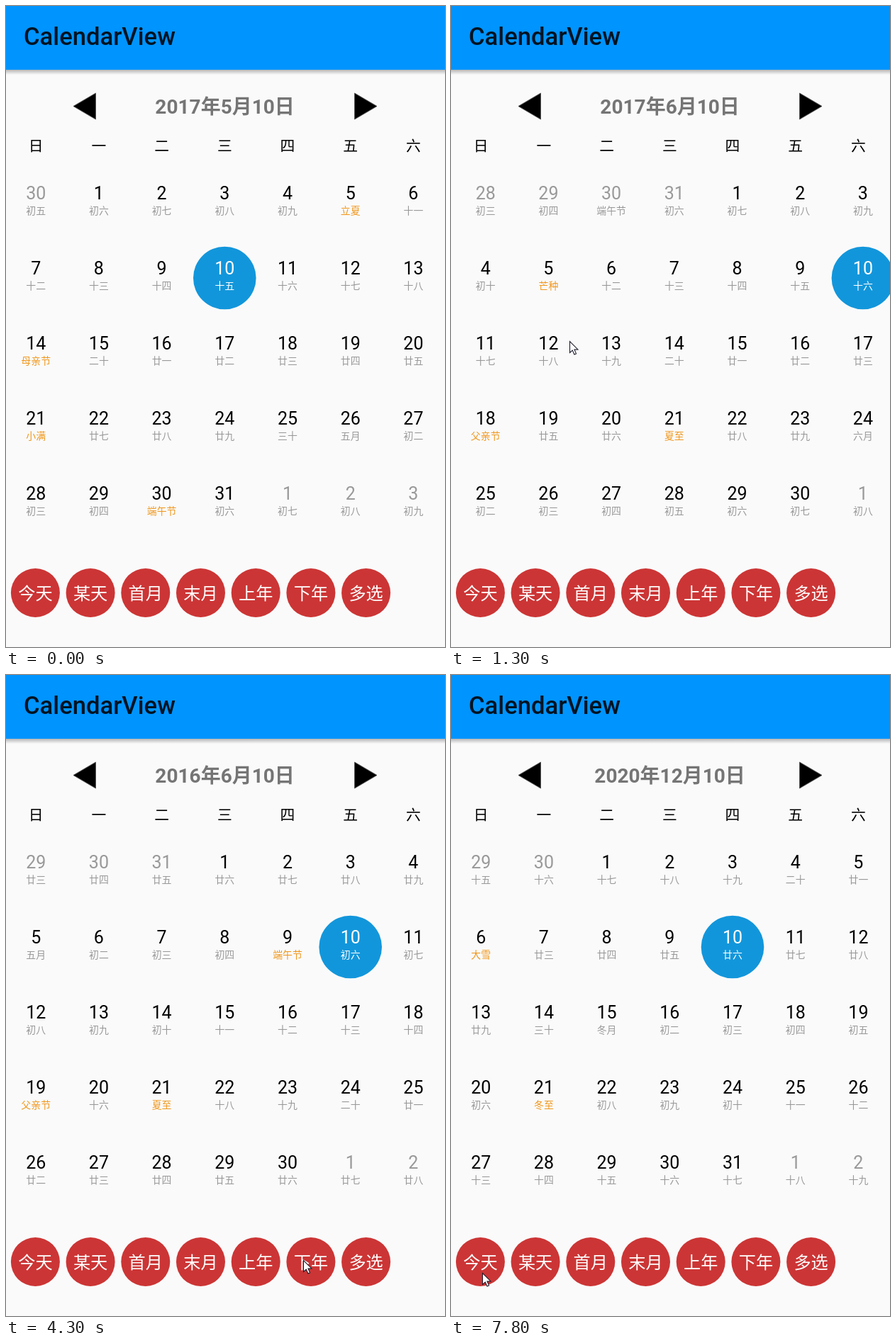
Write an HTML page with a canvas that moves like this. It is 619x905 px and loops after 8 s.

```html
<!DOCTYPE html>
<html lang="zh-CN">
<head>
<meta charset="utf-8">
<title>CalendarView</title>
<style>
  html, body { margin: 0; width: 100%; height: 100%; overflow: hidden; background: #fafafa; }
  canvas { display: block; }
</style>
</head>
<body>
<canvas id="stage" width="619" height="905"></canvas>
<script>
const ctx = document.getElementById('stage').getContext('2d');
const W = 619, H = 905, LOOP = 8000, TICK = 100;
const FONT = 'Roboto, "Noto Sans CJK SC", "Noto Sans CJK", sans-serif';
const COL0 = 42.2, COL = 88.7, ROW0 = 264, ROW = 106, PAGE = 622;
const GRAY = '#999', ORANGE = '#f0971d', BLUE = '#1296db', RED = '#cc3535';

// lunar: lunar day of the first cell; length: days in that lunar month; next: name of the following one
const may17 = { y: 2017, m: 5, lunar: 5, length: 30, next: '五月',
  feasts: { 5: '立夏', 14: '母亲节', 21: '小满', 30: '端午节' } };
const jun17 = { y: 2017, m: 6, lunar: 3, length: 29, next: '六月', before: { 30: '端午节' },
  feasts: { 5: '芒种', 18: '父亲节', 21: '夏至' } };
const jun15 = { y: 2015, m: 6, lunar: 14, length: 29, next: '五月',
  feasts: { 6: '芒种', 20: '端午节', 21: '父亲节', 22: '夏至' } };
const jun16 = { y: 2016, m: 6, lunar: 23, length: 29, next: '五月',
  feasts: { 9: '端午节', 19: '父亲节', 21: '夏至' } };
const jan90 = { y: 1990, m: 1, lunar: 4, length: 30, next: '春节',
  feasts: { 4: '腊八', 5: '小寒', 19: '小年', 20: '大寒', 26: '除夕', 27: '春节' } };
const dec20 = { y: 2020, m: 12, lunar: 15, length: 30, next: '冬月',
  feasts: { 6: '大雪', 21: '冬至' } };

const shown = [[0, may17], [1100, jun17], [2500, jun16], [3100, jun15], [4300, jun16], [5600, jan90], [6400, dec20]];

// Pointer waypoints: time, x, y
const pointer = [
  [100, 595, 205], [300, 500, 425], [400, 455, 472], [900, -5, 478], [1100, -16, 480], [1200, 80, 477],
  [1300, 167, 473], [1500, 272, 600], [1800, 338, 795], [1900, 345, 814], [2000, 343, 826],
  [3500, 343, 826], [3900, 419, 826], [4700, 419, 826], [4900, 370, 858], [5100, 295, 878],
  [5300, 212, 841], [5600, 212, 841], [5900, 278, 832], [6900, 278, 832], [7400, 47, 848],
  [7600, 47, 848], [7800, 44, 844], [8000, 44, 844]
];

const clamp = v => Math.max(0, Math.min(1, v));

function text(str, x, y, size, color, weight = 400, align = 'center') {
  ctx.font = `${weight} ${size}px ${FONT}`;
  ctx.fillStyle = color;
  ctx.textAlign = align;
  ctx.fillText(str, x, y);
}

function disc(x, y, r, color) {
  ctx.fillStyle = color;
  ctx.beginPath();
  ctx.arc(x, y, r, 0, Math.PI * 2);
  ctx.fill();
}

function polygon(points, fill, stroke, width = 1) {
  ctx.beginPath();
  points.forEach(([x, y]) => ctx.lineTo(x, y));
  ctx.closePath();
  ctx.fillStyle = fill;
  ctx.fill();
  ctx.strokeStyle = stroke;
  ctx.lineWidth = width;
  ctx.stroke();
}

function lunarName(n, { length, next }) {
  if (n > length) n -= length;
  if (n === 1) return next;
  if (n === 20) return '二十';
  if (n === 30) return '三十';
  return ['初', '十', '廿'][n > 10 ? Math.floor(n / 10) : 0] + '十一二三四五六七八九'[n % 10];
}

function drawMonth(page, dx) {
  const lead = new Date(page.y, page.m - 1, 1).getDay();
  const days = new Date(page.y, page.m, 0).getDate();
  for (let i = 0; i < 35; i++) {
    const x = COL0 + (i % 7) * COL + dx;
    if (x < -50 || x > W + 50) continue;
    const y = ROW0 + Math.floor(i / 7) * ROW;
    const n = i - lead + 1;
    const inside = n > 0 && n <= days;
    const day = new Date(page.y, page.m - 1, n).getDate();
    const feast = inside ? page.feasts[day] : n < 1 && page.before && page.before[day];
    const picked = inside && day === 10;
    if (picked) disc(x, y + 14, 44.3, BLUE);
    text(day, x, y + 9, 25, picked ? '#fff' : inside ? '#000' : GRAY);
    text(feast || lunarName(page.lunar + i, page), x, y + 30.3, 13.9,
      picked ? '#fff' : inside && feast ? ORANGE : GRAY);
  }
}

function drawFrame(page) {
  ctx.fillStyle = '#0094ff';
  ctx.fillRect(0, 0, W, 90);
  const shadow = ctx.createLinearGradient(0, 90, 0, 97);
  shadow.addColorStop(0, 'rgba(0,0,0,.28)');
  shadow.addColorStop(1, 'rgba(0,0,0,0)');
  ctx.fillStyle = shadow;
  ctx.fillRect(0, 90, W, 7);
  text('CalendarView', 25, 55, 34.6, 'rgba(0,0,0,.87)', 500, 'left');

  polygon([[95, 141.5], [126.5, 123], [126.5, 160]], '#000', '#555');
  polygon([[523, 141.5], [491.5, 123], [491.5, 160]], '#000', '#555');
  text(`${page.y}年${page.m}月10日`, 308.6, 152, 28, '#757575', 700);
  [...'日一二三四五六'].forEach((d, i) => text(d, COL0 + i * COL, 204.5, 20.8, '#000'));

  ['今天', '某天', '首月', '末月', '上年', '下年', '多选'].forEach((label, i) => {
    const x = 41.4 + i * 77.7;
    disc(x, 828.5, 34.5, RED);
    text(label, x, 838, 24.2, '#fff');
  });
}

function drawPointer(t) {
  const k = pointer.findIndex(p => p[0] > t);
  if (k < 1) return;
  const [a, b] = [pointer[k - 1], pointer[k]];
  const f = (t - a[0]) / (b[0] - a[0]);
  ctx.save();
  ctx.translate(a[1] + (b[1] - a[1]) * f + .5, a[2] + (b[2] - a[2]) * f + .5);
  polygon([[0, 0], [0, 16], [3.8, 12.6], [6.4, 18.5], [9, 17.4], [6.5, 11.6], [11.4, 11.4]], '#fff', '#1c1c2b', 1.1);
  ctx.restore();
}

function draw(now) {
  const t = Math.floor(now % LOOP / TICK) * TICK;
  const page = shown.filter(s => s[0] <= t).pop()[1];
  ctx.fillStyle = '#fafafa';
  ctx.fillRect(0, 0, W, H);
  if (t < 2500) {
    // Drag by hand, then settle with a quintic ease-out
    const drag = 440 * clamp((t - 412) / 488);
    const rest = (1 - clamp((t - 1008) / 600)) ** 5;
    const offset = t < 1008 ? drag : PAGE - (PAGE - 440) * rest;
    drawMonth(may17, -offset);
    drawMonth(jun17, PAGE - offset);
  } else {
    drawMonth(page, 0);
  }
  drawFrame(page);
  drawPointer(t);
}

const start = performance.now();
(function loop() {
  draw(performance.now() - start);
  requestAnimationFrame(loop);
})();
</script>
</body>
</html>
```
